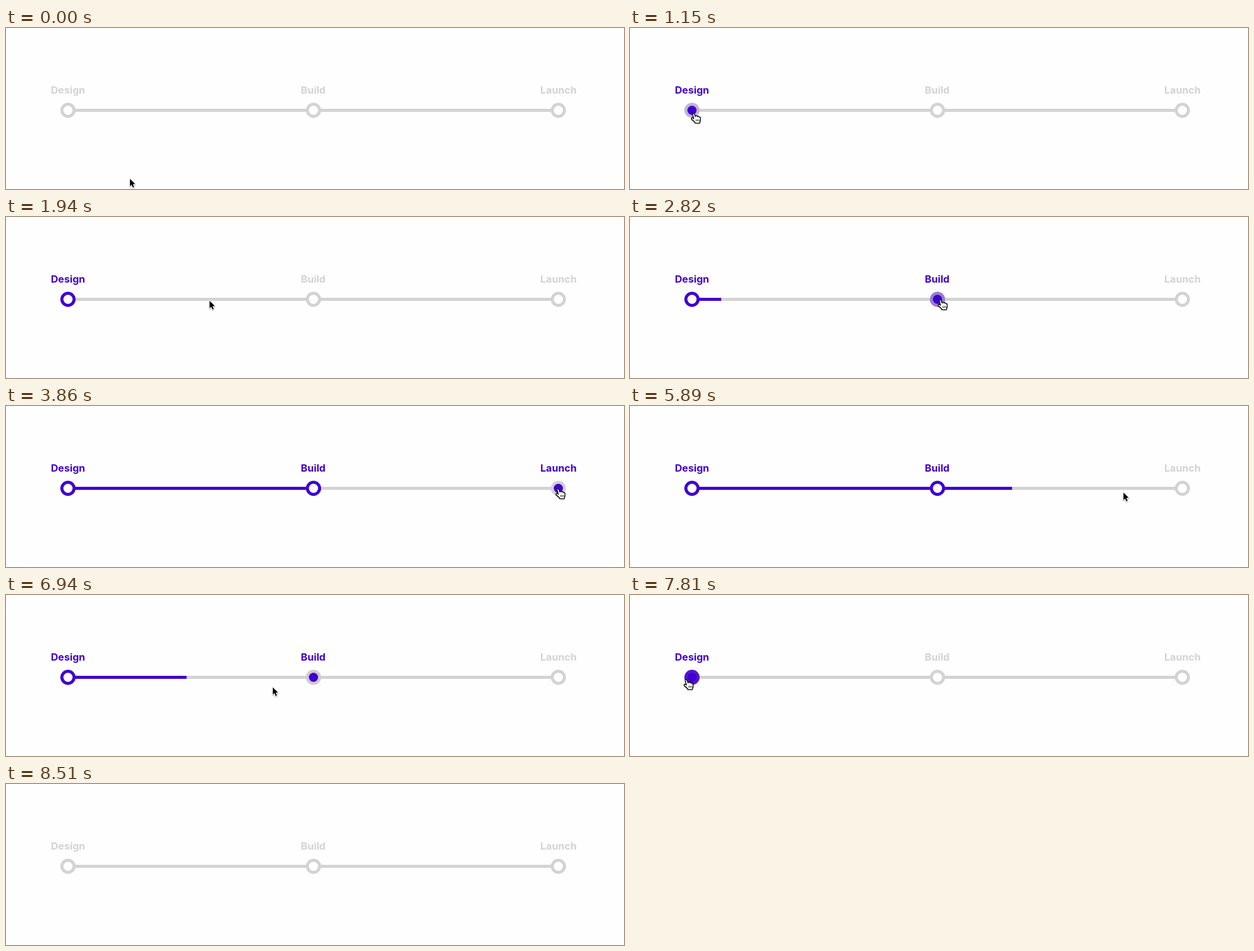
An HTML page with a canvas that plays this animation: 1012x265 px, repeating every 9.13 s.

```html
<!DOCTYPE html>
<html lang="en">
<head>
<meta charset="utf-8">
<title>Progress steps</title>
<style>
  html, body { margin: 0; width: 100%; height: 100%; overflow: hidden; background: #fefefe; }
  canvas { position: absolute; left: 0; top: 0; width: 1012px; height: 265px; }
  span {
    position: absolute; top: 92px; width: 120px; text-align: center;
    font: 700 16.5px/20px Inter, "Liberation Sans", sans-serif;
  }
</style>
</head>
<body>
<span style="left:41.5px">Design</span>
<span style="left:443px">Build</span>
<span style="left:844.7px">Launch</span>
<canvas></canvas>
<script>
const LOOP = 9130, TICK = LOOP / 104;
const GREY = [211, 211, 211], PURPLE = [64, 0, 208], WHITE = [254, 254, 254];
const Y = 135.5, LINE_MS = 900, RING_MS = 360, HOVER_LAG = 100;

// x: centre of the node, on/off: when it is checked and unchecked
const nodes = [
  { x: 101.5, on: 1096, off: 7775 },
  { x: 503.5, on: 2720, off: 6663 },
  { x: 904.5, on: 4201, off: 5505 }
];

// pointer trips: start, end, control point, destination
const moves = [
  { a: 10, b: 690, c: [150, 190], to: [104, 140] },
  { a: 1510, b: 2285, c: [306, 136], to: [508, 136] },
  { a: 2900, b: 3640, c: [720, 134], to: [930, 136] },
  { a: 3640, b: 3860, c: [917, 136], to: [904, 136] },
  { a: 5640, b: 6390, c: [706, 150], to: [508, 137] },
  { a: 6690, b: 7340, c: [440, 168], to: [92, 139] },
  { a: 8000, b: 8500, c: [500, -147], to: [961, 270] }
];

const hand = new Path2D("M-1.6 1.2Q-.6-.6 1 .8L3.2 6Q3.5 4 5 4.4Q6 4.6 6.3 6Q7 4.8 8.2 5.3" +
  "Q9 5.6 9.2 7Q10 6 11 7.2Q11.8 9 11 12Q10.5 14 10 16.5L3 16.5Q2 14-2.5 10.8" +
  "Q-4.2 8.7-2.8 8Q-1.5 7.6.5 9.4Z");
const creases = new Path2D("M4.3 10.5V13.5M6.5 10.5V13.5M8.7 10.5V13.5");
const arrow = new Path2D("M0 0V12.2L2.7 9.7L4.8 14.4L6.8 13.5L4.8 8.9L8.6 8.6Z");

const canvas = document.querySelector("canvas");
const labels = document.querySelectorAll("span");
const ctx = canvas.getContext("2d");
const dpr = window.devicePixelRatio || 1;
canvas.width = 1012 * dpr;
canvas.height = 265 * dpr;

const clamp = v => Math.min(1, Math.max(0, v));
const smooth = v => v * v * (3 - 2 * v);
const mix = (p, q, f) => `rgb(${p.map((v, i) => Math.round(v + (q[i] - v) * f))})`;

// cubic-bezier(.25, .1, .25, 1)
function ease(x) {
  if (x <= 0) return 0;
  if (x >= 1) return 1;
  let lo = 0, hi = 1, u;
  for (let i = 0; i < 24; i++) {
    u = (lo + hi) / 2;
    if (0.75 * u * (1 - u) + u * u * u < x) lo = u; else hi = u;
  }
  return 0.3 * u * (1 - u) * (1 - u) + 3 * u * u * (1 - u) + u * u * u;
}

const level = (n, t, ms) => ease((t - n.on) / ms) - ease((t - n.off) / ms);

function pointer(t) {
  let p = [202, 247];
  for (const m of moves) {
    if (t <= m.a) break;
    const u = smooth(clamp((t - m.a) / (m.b - m.a))), v = 1 - u;
    p = p.map((s, i) => v * v * s + 2 * u * v * m.c[i] + u * u * m.to[i]);
  }
  return p;
}

const near = (n, p) => Math.hypot(p[0] - n.x, p[1] - Y) < 26;

function disc(x, r, color) {
  ctx.fillStyle = color;
  ctx.beginPath();
  ctx.arc(x, Y, r, 0, Math.PI * 2);
  ctx.fill();
}

function bar(x, w, color) {
  ctx.fillStyle = color;
  ctx.fillRect(x, Y - 2.5, w, 5);
}

function drawPointer(p) {
  const over = nodes.some(n => near(n, p));
  ctx.save();
  ctx.lineJoin = "round";
  ctx.shadowColor = "rgba(0,0,0,.35)";
  ctx.shadowBlur = 2 * dpr;
  ctx.shadowOffsetY = dpr;
  ctx.translate(p[0] + (over ? 0 : 1), p[1] + (over ? 0 : 1.2));
  const shape = over ? hand : arrow;
  ctx.strokeStyle = over ? "#000" : "#fff";
  ctx.lineWidth = over ? 1.2 : 1.8;
  ctx.fillStyle = over ? "#fff" : "#000";
  if (over) ctx.fill(shape);
  ctx.stroke(shape);
  ctx.shadowColor = "transparent";
  ctx.fill(shape);
  if (over) {
    ctx.stroke(shape);
    ctx.lineWidth = 0.9;
    ctx.stroke(creases);
  }
  ctx.restore();
}

function draw(t) {
  const seen = pointer(t - HOVER_LAG);
  ctx.setTransform(dpr, 0, 0, dpr, 0, 0);
  ctx.clearRect(0, 0, 1012, 265);

  for (let i = 1; i < nodes.length; i++) {
    const x = nodes[i - 1].x + 12.5, w = nodes[i].x - 12.5 - x;
    bar(x - 2, w + 4, mix(GREY, GREY, 0));
    const done = level(nodes[i], t, LINE_MS) * w;
    if (done > 0.2) bar(x - 2, done + 2, mix(PURPLE, PURPLE, 0));
  }

  nodes.forEach((n, i) => {
    const hover = near(n, seen) ? 1 : 0;
    const ring = level(n, t, RING_MS);
    disc(n.x, 12.5, mix(GREY, PURPLE, ring));
    disc(n.x, 7.5, mix(WHITE, PURPLE, hover));
    labels[i].style.color = mix(GREY, PURPLE, Math.max(hover, ring));
  });

  drawPointer(pointer(t));
}

// the picture advances in even ticks, about 11 a second
function frame() {
  const t = performance.now() % LOOP;
  draw(Math.floor((t + 10) / TICK) * TICK);
  requestAnimationFrame(frame);
}
frame();
</script>
</body>
</html>
```
